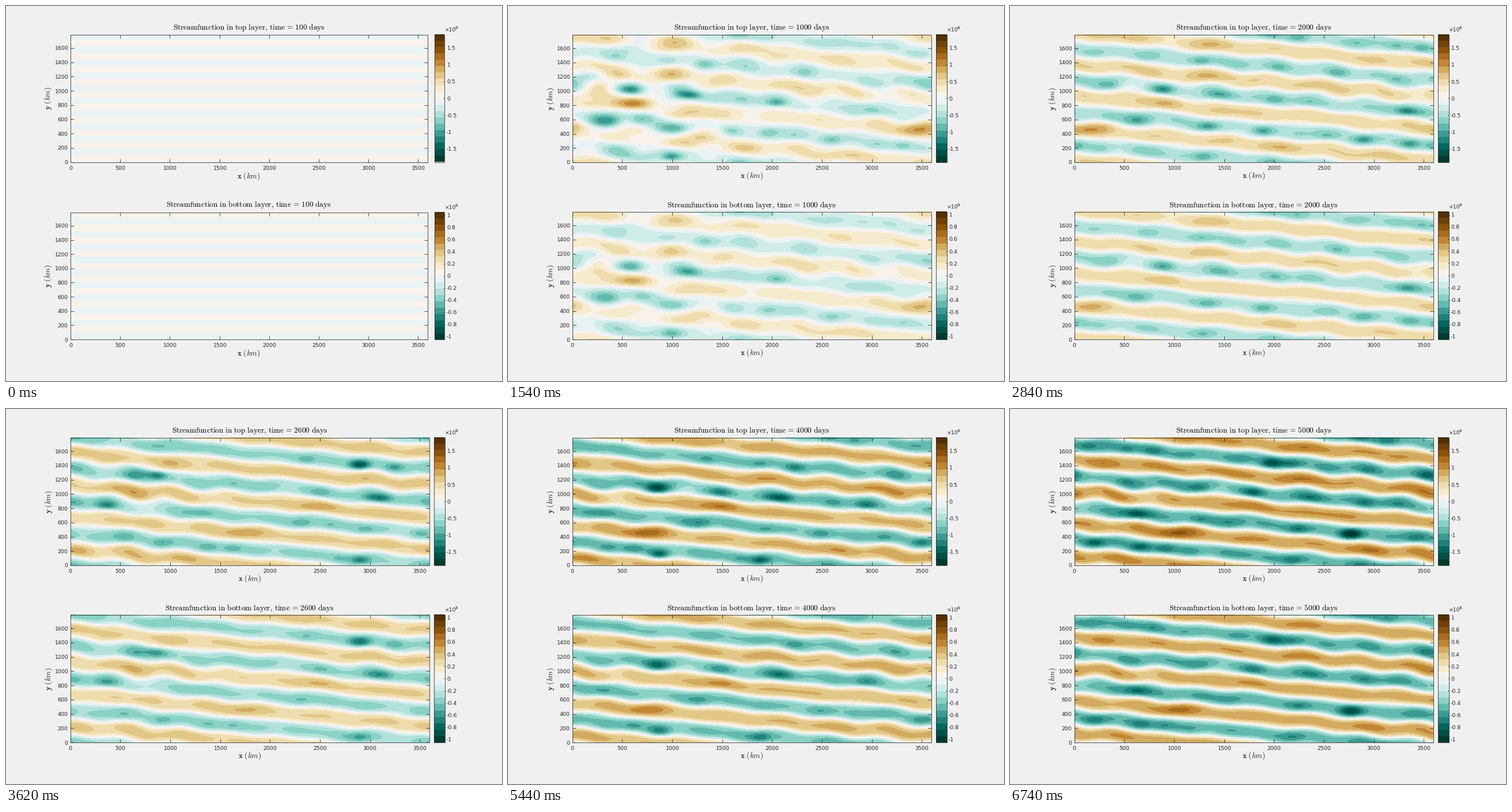
A matplotlib script for the animation above (6.87 s loop, 861x650 px).

```python
import numpy as np
import matplotlib as mpl
import matplotlib.pyplot as plt
from matplotlib.animation import FuncAnimation
from matplotlib.collections import LineCollection

W, H, DPI = 861, 650, 64
PX = 72 / DPI                    # points per pixel
LX, LY = 3600, 1800              # periodic channel, km
XMAX, YMAX = 3593, 1790          # plotted range, km
STEP, HOLD, STAY, STATES = 30, 500, 130, 50
TURNS = 4                        # the jets form one helix with four turns
GAP = LY / TURNS
SPEED = 3.3                      # westward wave speed, km per day
VORTEX_SPEED = 3.65
DAY0, Y0 = 1400, 45              # a trough crosses x = 0 at Y0 on DAY0
INK = "#262626"

plt.rcParams["font.family"] = "DejaVu Sans"
plt.rcParams["mathtext.fontset"] = "cm"

x = np.linspace(0, XMAX, 623)
y = np.linspace(0, YMAX, 222)
rng = np.random.default_rng(7)

colors = mpl.colormaps["BrBG_r"](np.linspace(0, 1, 20))[:, :3] * 255
colors = colors.round().astype(np.uint8)
colors[9], colors[10] = (233, 243, 245), (248, 242, 235)

# long-lived vortices: x, y and day of greatest strength
VORTICES = np.array([
    (2800, 590, 1400), (500, 420, 1400), (2900, 1400, 2600),
    (870, 1260, 2600), (200, 990, 3300), (840, 1080, 4000),
    (870, 140, 4000), (1980, 1430, 5000), (2760, 430, 5000)])


def make_modes(count, max_l):
    return (rng.integers(2, 8, count), rng.integers(-max_l, max_l + 1, count),
            rng.uniform(0, 2 * np.pi, count))


def texture(modes, day):
    """Sum of drifting plane waves with unit variance."""
    k, l, phase = modes
    ex = np.exp(2j * np.pi * np.outer(k, x + SPEED * day) / LX)
    ey = np.exp(2j * np.pi * np.outer(y, l) / LY + 1j * phase)
    return (ey @ ex).real * np.sqrt(2 / len(k))


def bump(grid, centre, period, width):
    d = (grid - centre[:, None] + period / 2) % period - period / 2
    return np.exp(-0.5 * (d / width) ** 2)


def blobs(cx, cy, amp, wx, wy):
    return (bump(y, cy, LY, wy) * amp[:, None]).T @ bump(x, cx, LX, wx)


def make_chain(count, low, high):
    """Evenly strewn points along the helix, with strength and phase."""
    s = (np.arange(count) + rng.uniform(-.35, .35, count)) * TURNS * LX / count
    return s, rng.uniform(low, high, count), rng.uniform(0, 2 * np.pi, count)


def chain(links, day, offset, wx, wy):
    s, amp, phase = links
    pulse = 0.65 + 0.35 * np.sin(2 * np.pi * day / 1500 + phase)
    return blobs(s - SPEED * (day - DAY0), Y0 + offset - GAP * s / LX,
                 amp * pulse, wx, wy)


MEANDER, RIPPLE = make_modes(16, 2), make_modes(30, 6)
TROUGHS, CRESTS = make_chain(44, -.75, -.05), make_chain(22, .05, .35)


def eddies(day, spread):
    vx, vy, peak = VORTICES.T
    age = day - peak
    strength = -0.75 * np.exp(-(age / 450) ** 2)
    return (blobs(vx - VORTEX_SPEED * age, vy, strength, 75 * spread, 52 * spread)
            + chain(TROUGHS, day, -20, 75 * spread, 45 * spread)
            + chain(CRESTS, day, GAP / 2, 160, 48))


def layer_index(day, top):
    """Colour band of each cell in one layer."""
    grow = min(1, (day - 100) / 500) ** 3
    start = 0.08 * max(0, 1 - (day - 100) / 350) * np.sin(20 * np.pi * y / LY)[:, None]
    amp = np.interp(day, [600, 1400, 5000], [.22, .44, .92])
    rough = np.interp(day, [600, 1400], [.25, .07])
    shift = Y0 - SPEED * (day - DAY0) / LX * GAP
    theta = 2 * np.pi * ((y[:, None] - shift) / GAP + x / LX)
    wave = np.cos(theta + 0.2 * texture(MEANDER, day))
    bands = -amp * np.tanh(1.2 * wave) / np.tanh(1.2)
    packet = 1 + 0.6 * np.cos(2 * np.pi * (x - 600) / LX)
    ripple = rough * packet * texture(RIPPLE, day)
    if top:
        psi, limit = start + grow * (bands + ripple + eddies(day, 1)), 1.9
    else:
        psi = -start + grow * (.52 * bands + .4 * ripple + .42 * eddies(day, 1.15))
        limit = 1.05
    return np.clip(np.floor((psi / limit + 1) * 10), 0, 19).astype(np.uint8)


fields = [[layer_index(100 * (n + 1), top) for top in (True, False)]
          for n in range(STATES)]

fig = plt.figure(figsize=(W / DPI, H / DPI), dpi=DPI, facecolor="#f0f0f0")
ax = fig.add_axes([0, 0, 1, 1])
ax.axis("off")


def label(px, py, text, size=9.4, **kw):
    kw = dict(color=INK, va="baseline") | kw
    return ax.text(px, py, text, fontsize=size * PX, **kw)


def box(l, r, t, b):
    return [[(l, t), (r, t)], [(l, b), (r, b)], [(l, t), (l, b)], [(r, t), (r, b)]]


def make_panel(name, l, r, t, b, bar, limit, ticks, title_y, x_drop, y_left):
    """One map with its axes, colour bar and title."""
    def image(data, x0, x1):
        return ax.imshow(data, extent=(x0, x1, b, t), origin="lower",
                         aspect="auto", interpolation="nearest")

    field = image(colors[fields[0][0]], l, r)
    parts = [field, image(colors[:, None], *bar)]
    lines = box(l, r, t, b) + box(*bar, t, b)
    mid = (t + b) / 2
    for v in range(0, 3501, 500):
        px = l + (r - l) * v / XMAX
        lines += [[(px, b), (px, b - 6)], [(px, t), (px, t + 6)]]
        parts.append(label(px, b + 13.2, str(v), ha="center"))
    for v in range(0, 1601, 200):
        py = b - (b - t) * v / YMAX
        lines += [[(l, py), (l + 6, py)], [(r, py), (r - 6, py)]]
        parts.append(label(107.5, py + 3.5, str(v), ha="right"))
    for v in ticks:
        py = mid - (b - t) / 2 * v / limit
        lines.append([(bar[1], py), (bar[1] - 2, py)])
        parts.append(label(765, py + 3.5, f"{v:g}"))
    parts += [
        label(761.5, t - 5.5, "×10", 9.2),
        label(779.5, t - 9.5, "8", 7.2),
        label((l + r) / 2, b + x_drop, r"$\mathbf{x}\ (km)$", 13.3, ha="center"),
        label(y_left, mid, r"$\mathbf{y}\ (km)$", 13.3, rotation=90,
              ha="center", va="center"),
    ]
    title = label((l + r) / 2, title_y, "", 13.3, color="black", ha="center")
    edges = LineCollection(lines, colors=INK, linewidths=0.8 * PX, zorder=3)
    ax.add_collection(edges)
    parts += [title, edges]
    return dict(name=name, field=field, title=title, parts=parts)


TOP_TICKS = np.arange(-3, 4) / 2
LOW_TICKS = np.arange(-5, 6) / 5


def make_layout(l, r, bar, b_top, t_low, title_y, x_drop, y_left):
    return [make_panel("top", l, r, 49.5, b_top, bar, 1.9, TOP_TICKS,
                       title_y, x_drop, y_left),
            make_panel("bottom", l, r, t_low, 578, bar, 1.05, LOW_TICKS,
                       title_y + 307.5, x_drop, y_left)]


layouts = [make_layout(112, 731.5, (743.5, 760.5), 270.5, 357.5, 40.5, 28, 73),
           make_layout(111.5, 734.5, (742.5, 761.5), 271, 356.5, 41, 27, 74.5)]
ax.set_xlim(0, W)
ax.set_ylim(H, 0)


def draw(k):
    n = max(0, (STEP * k + 20 - HOLD) // STAY + 1)
    for i, layout in enumerate(layouts):
        shown = i == min(n, 1)
        for panel, cells in zip(layout, fields[n]):
            for part in panel["parts"]:
                part.set_visible(shown)
            if shown:
                panel["field"].set_data(colors[cells])
                panel["title"].set_text(
                    rf"$\mathrm{{Streamfunction\ in\ {panel['name']}\ layer,\,time}}"
                    rf"\,=\,\mathrm{{{100 * (n + 1)}\ days}}$")
    return []


frames = (HOLD + STAY * (STATES - 1)) // STEP
anim = FuncAnimation(fig, draw, frames=frames, interval=STEP,
                     repeat=True, repeat_delay=0, cache_frame_data=False)
plt.show()
```
